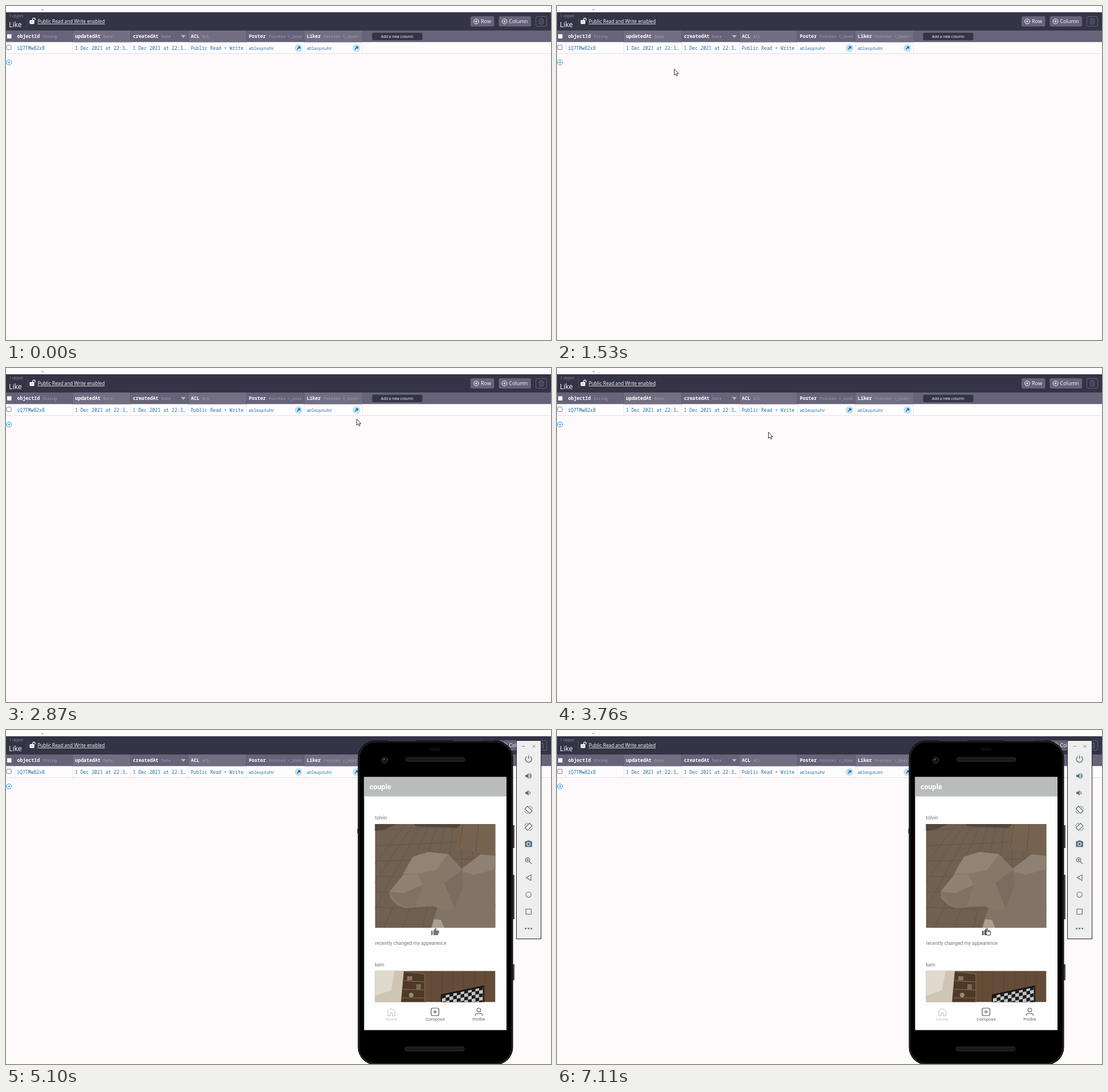
An HTML page for the animation above (8000 ms loop, 955 by 586 pixels).

```html
<!DOCTYPE html>
<html lang="en">
<head>
<meta charset="utf-8">
<title>Data browser and phone</title>
<style>
html, body { margin: 0; width: 100%; height: 100%; overflow: hidden; background: #fefafb; }
svg { display: block; width: 955px; height: 586px; }
.ui { font-family: "Open Sans", "Noto Sans", sans-serif; }
.mono { font-family: "Noto Sans Mono", "DejaVu Sans Mono", monospace; }
.app { font-family: Roboto, sans-serif; }
text { white-space: pre; }
</style>
</head>
<body>
<svg id="stage" viewBox="0 0 955 586" xmlns="http://www.w3.org/2000/svg"></svg>
<script>
const LOOP = 8000, PHONE_AT = 5100, HAND_AT = 6640, PRESS_AT = 6980;
const DARK = '#353446', BAR = '#66637a', BAR_LIGHT = '#726f84';
const LINK = '#1f72ab', BLUE = '#169cee', TOOL = '#546e7a';

const rect = (x, y, w, h, fill, extra = '') =>
  `<rect x="${x}" y="${y}" width="${w}" height="${h}" fill="${fill}" ${extra}/>`;
const text = (x, y, size, fill, str, font = 'ui', extra = '') =>
  `<text x="${x}" y="${y}" font-size="${size}" fill="${fill}" class="${font}" ${extra}>${str}</text>`;
const path = (d, fill, extra = '') => `<path d="${d}" fill="${fill}" ${extra}/>`;
const line = (d, color, width = 1, extra = '') =>
  `<path d="${d}" fill="none" stroke="${color}" stroke-width="${width}" ${extra}/>`;
const circle = (x, y, r, fill, extra = '') =>
  `<circle cx="${x}" cy="${y}" r="${r}" fill="${fill}" ${extra}/>`;
const at = (x, y, body, scale = 1) => `<g transform="translate(${x} ${y}) scale(${scale})">${body}</g>`;
const clipped = (id, x, y, w, h, body) =>
  `<clipPath id="${id}">${rect(x, y, w, h, '#000')}</clipPath><g clip-path="url(#${id})">${body}</g>`;
const plus = (x, y, r, color) =>
  circle(x, y, r, 'none', `stroke="${color}"`) +
  line(`M${x - r / 2} ${y}h${r}M${x} ${y - r / 2}v${r}`, color);

// [x, name, type, name width, light background]
const columns = [
  [15, 'objectId', 'String', 45, 0],
  [116.5, 'updatedAt', 'Date', 50, 1],
  [218, 'createdAt', 'Date', 50, 0],
  [319.5, 'ACL', 'ACL', 20.5, 1],
  [421, 'Poster', 'Pointer &lt;_User&gt;', 35.5, 0],
  [522.5, 'Liker', 'Pointer &lt;_User&gt;', 30.5, 1]
];
const cells = ['iQ7TMwB2xB', '1 Dec 2021 at 22:3…', '1 Dec 2021 at 22:3…',
  'Public Read + Write', 'aDlmzpXuhV', 'aDlmzpXuhV'];

function toolbar() {
  return rect(0, 0, 955, 11, '#fefcfd') +
    path('M61.5 7q2.5-3 5 0z', '#4b9cc9') +
    rect(0, 11, 955, 32.5, DARK) +
    text(5.5, 20, 6.7, '#8f8da0', '1 object') +
    text(5, 37, 12.3, '#fff', 'Like') +
    rect(37, 18, 1, 18, '#494757') +
    rect(41.5, 24.8, 8, 6.7, '#fff', 'rx=".8"') +
    line('M46.8 25v-1.8a2.1 2.1 0 0 1 4.2 0v2', '#fff', 1.2) +
    rect(45, 27, 1, 2, DARK) +
    text(55.5, 30.3, 8.25, '#fff', 'Public Read and Write enabled') +
    rect(55.5, 31.3, 117.5, .8, '#fff') +
    rect(814, 18, 41.5, 18, BAR, 'rx="2.5"') + plus(824, 27, 4.3, '#fff') +
    text(832, 30.4, 9.1, '#fff', 'Row') +
    rect(863.5, 18, 56.5, 18, BAR, 'rx="2.5"') + plus(873.5, 27, 4.3, '#fff') +
    text(881.3, 30.4, 9.1, '#fff', 'Column') +
    rect(928.5, 18.5, 19, 17, 'none', `rx="2.5" stroke="${BAR}"`) +
    line('M933.5 24h9M936.5 23.5v-1.5h3v1.5M934.5 24v7.5h7V24M937 26v4M939.2 26v4', BAR);
}

function table() {
  let s = rect(0, 43, 955, 20.5, BAR) + rect(0, 63.5, 955, 20, '#fefcfd');
  columns.forEach(([x, name, type, w, light], i) => {
    if (light) s += rect(x, 43, 101.5, 20.5, BAR_LIGHT);
    s += text(x + 4.5, 56, 8.25, '#fff', name, 'mono', 'font-weight="600"') +
      clipped('head' + i, x, 43, 98.5, 21, text(x + 4 + w, 55.5, 6.95, '#a3a0b3', type, 'mono')) +
      rect(x - .3, 43, .8, 20.5, '#5c596f') + rect(x, 63.5, .8, 20, '#e6e2ea') +
      text(x + 4.2, i > 3 ? 76.6 : 76.9, i > 3 ? 7.4 : 8.12, LINK, cells[i], 'mono');
    if (i > 3) s += circle(x + 91.5, 73.8, 6.8, '#c6e2f2') +
      line(`M${x + 89} 76.3l4.5-4.5M${x + 90.3} 71.5h3.6v3.6`, '#0e69a1', 1.5);
  });
  return s + rect(624, 63.5, .8, 20, '#e6e2ea') + rect(0, 83, 955, 1, '#e3dfe7') +
    path('M306.5 51h8.5l-4.25 5z', '#b5b3c2') +
    rect(2, 49.5, 7.5, 7.5, '#fff', 'rx=".7"') +
    rect(1.2, 68.7, 7.8, 7.8, '#fff', 'rx="1.3" stroke="#737078" stroke-width=".9"') +
    rect(641.5, 47, 88, 13, DARK, 'rx="2.5"') +
    text(657, 55.9, 6.6, '#fff', 'Add a new column') +
    plus(5.3, 99, 4.4, BLUE);
}

function dogPhoto() {
  let planks = '';
  for (let i = 0; i < 11; i++) planks += `M${560 + i * 34} 347L${700 + i * 14} 165`;
  for (let i = 0; i < 7; i++) planks += `M647 ${176 + i * 27}L860 ${163 + i * 31}`;
  const scene = rect(646.5, 165, 211, 182, '#6f6051') +
    line(planks, '#615345', .8) +
    path('M646 165h40l-24 10-16 2z', '#55473b') +
    path('M715 165h82l-6 7-72-3z', '#54463a') +
    path('M797 165h61v57l-68-15z', '#75634f') +
    line('M801 165l-7 41M828 165l-5 48', '#5f4f40') +
    path('M794 247l38-29 26 3v126H744l12-35z', '#817466') +
    path('M832 218l-38 29 26 7 38-10v-23z', '#8e8172') +
    path('M672 284l24-30 10-20 8-12 26-8 35 4 25 27 2 28-16 41-18 3-18-8-32 2-18 2-15-6-12-12z', '#857869') +
    path('M672 284l24-30 24-2 10 20-32 14z', '#8f8272') +
    path('M706 234l8-12 26-8 35 4-21 28-34 6h-24z', '#918474') +
    path('M775 218l25 27 2 28-16 41-18-46-14-22z', '#7a6d5f') +
    path('M775 218l25 27-32 23-14-22z', '#857868') +
    path('M672 284l13 17 15 12 18-3 12-38-32 14z', '#7f7263') +
    path('M750 332l12 1 6 14h-22z', '#ab9f90');
  return clipped('dog', 646.5, 165, 211, 182, scene);
}

function roomPhoto() {
  let boards = '';
  for (let x = 745; x < 857; x += 19) boards += `M${x} 422.5v55`;
  const scene = rect(646.5, 422.5, 211, 55, '#644c38') + line(boards, '#59432f', .8) +
    path('M646.5 422.5H697l-5 55h-45.5z', '#cfc5b5') +
    path('M646.5 422.5H681l-6 34-28.5 10z', '#e0d9cd') +
    path('M698 424l36 4v49.5h-41z', '#4c3928') +
    line('M698 440l36 2M696 455l38 1M694 470h40M699 424l35 4v50', '#7a5f44', 1.6) +
    rect(703, 432, 9, 7, '#8a735a') + circle(710, 465, 4, '#a08a6e') +
    rect(719, 446, 8, 9, '#7d664e') +
    `<pattern id="check" width="13" height="12" patternUnits="userSpaceOnUse" patternTransform="translate(764 465) skewY(-12)">
      ${rect(0, 0, 13, 12, '#c4c4c4')}${rect(0, 0, 6.5, 6, '#1c1c1c')}${rect(6.5, 6, 6.5, 6, '#1c1c1c')}</pattern>` +
    path('M762 464l76-16v29.5h-76z', '#171615') +
    path('M764 466.5l72-15v26h-72z', 'url(#check)');
  return clipped('room', 646.5, 422.5, 211, 55, scene);
}

const THUMB = 'M1 21h4V9H1zM23 10c0-1.1-.9-2-2-2h-6.3l1-4.6c0-.7-.1-1.1-.5-1.5L14.2 1 7.6 7.6C7.2 8 7 8.5 7 9v10c0 1.1.9 2 2 2h9c.8 0 1.5-.5 1.8-1.2l3-7c.1-.3.2-.5.2-.8z';

function tools() {
  const speaker = path('M3 9v6h4l5 5V4L7 9z', TOOL);
  const turn = line('M9.3 1.8L22.2 14.7l-7.5 7.5L1.8 9.3z', TOOL, 2, 'stroke-linejoin="round"') +
    line('M14 1.2q7.5 1 9 8M10 22.8q-7.500-1-9-8', TOOL, 1.4);
  const icons = [
    line('M12 2v10M7 5a9 9 0 1 0 10 0', TOOL, 2.2),
    speaker + line('M14.5 8q4 4 0 8M15 4q10 8 0 16', TOOL, 2),
    speaker + line('M14.5 8q4 4 0 8', TOOL, 2),
    turn,
    `<g transform="matrix(-1 0 0 1 24 0)">${turn}</g>`,
    path('M2 5h5l2-2.5h6L17 5h5v16H2z', TOOL) + circle(12, 13, 4.5, 'none', 'stroke="#eee" stroke-width="2"'),
    circle(9.5, 9.5, 6, 'none', `stroke="${TOOL}" stroke-width="2"`) +
      line('M14 14l7 7M6.5 9.5h6M9.5 6.5v6', TOOL, 2),
    line('M19 4v16L5 12z', TOOL, 1.8),
    circle(12, 12, 7.5, 'none', `stroke="${TOOL}" stroke-width="1.8"`),
    line('M4.5 4.5h15v15h-15z', TOOL, 1.8),
    [4, 12, 20].map(x => circle(x, 12, 2.3, TOOL)).join('')
  ];
  return rect(894.5, 18.5, 43, 348, '#eee', 'stroke="#222"') +
    line('M904.5 28.5h5M922.5 26l5 5M927.5 26l-5 5', '#777', .9) +
    icons.map((icon, i) => at(908.2, 43.4 + i * 29.75, icon, .62)).join('');
}

function phone() {
  const side = (y, h) => rect(888, y, 3, h, '#4d4d52');
  const label = (x, color, name) => text(x, 510.3, 7.9, color, name, 'app', 'text-anchor="middle"');
  return side(167, 40) + side(254, 78) + side(411, 28) + rect(615.5, 173, 2, 8, '#555') +
    rect(616.5, 18.5, 272, 569, '#000', 'rx="31"') +
    rect(618.5, 20.5, 268, 565, 'none', 'rx="29" stroke="#242426" stroke-width="2"') +
    line('M670 18.5h49M783 18.5h52', '#4a4753') +
    rect(743, 31, 18, 6, '#0d0d0d', 'rx="2"') +
    circle(663.5, 53, 5.8, '#29292b') + circle(663.5, 53, 3.5, '#0c0c0d') + circle(662.5, 52, 1.3, '#77777c') +
    rect(700.5, 48.5, 103.5, 6.5, '#191919', 'rx="3" stroke="#303030"') +
    rect(699, 556, 104, 7, '#191919', 'rx="3" stroke="#303030"') +
    rect(627.5, 82.5, 249.5, 444, '#fefefe') +
    rect(627.5, 82.5, 249.5, 34, '#babcbb') +
    text(637, 104.2, 12.5, '#fff', 'couple', 'app', 'font-weight="700"') +
    text(646.5, 157.2, 8.57, '#777', 'tolvin', 'app') + dogPhoto() +
    at(744.4, 346.6, path(THUMB, '#757575', 'id="like"'), .636) +
    text(646.5, 376.8, 8.57, '#777', 'recently changed my appearence', 'app') +
    text(646.5, 415.2, 8.57, '#777', 'kem', 'app') + roomPhoto() +
    rect(640, 482, 224, .7, '#f2f2f2') +
    line('M667.5 494.5l7.5-6.5 7.5 6.5M669 493.5v8h4v-5h4v5h4.5v-8', '#bbb') +
    rect(745, 488, 13.5, 13, 'none', 'rx="2.5" stroke="#555" stroke-width="1.2"') +
    line('M748.5 494.5h6.5M751.75 491.3v6.5', '#555', 1.2) +
    circle(828.5, 491.3, 3.3, 'none', 'stroke="#555" stroke-width="1.1"') +
    line('M822.5 501.5v-1q0-3 3-3h6q3 0 3 3v1', '#555', 1.1) +
    label(675, '#c4c4c4', 'Home') + label(752, '#666', 'Compose') + label(828.5, '#666', 'Profile') +
    tools();
}

// Each move: start, end, steps, then keys of [step, x, y]; the pointer holds between steps.
const moves = [
  [530, 1320, 13, [0, 941, 578], [3, 865, 465], [7, 733, 325], [10, 545, 195], [12, 403, 124]],
  [1390, 1860, 8, [0, 335, 123], [4, 75, 97], [6, 13, 87], [7, 22, 88]],
  [2060, 2800, 12, [0, 48, 85], [2, 172, 78.5], [5, 335, 69], [9, 530, 85], [11, 599, 91]],
  [2870, 2870, 1, [0, 614, 89]],
  [3220, 3560, 6, [0, 590, 92], [3, 425, 95], [5, 347, 95]],
  [3760, 4230, 8, [0, 370, 112], [4, 655, 370], [7, 819, 529]],
  [4430, 4500, 2, [0, 821, 545], [1, 825, 570]],
  [4570, 4570, 1, [0, -50, -50]],
  [5630, 6370, 11, [0, 822, 558], [4, 795, 468], [8, 757, 373], [10, 749, 354]],
  [6640, 6710, 2, [0, 750, 348], [1, 750, 347]]
];

function pointer(t) {
  const move = moves.filter(m => m[0] <= t).pop();
  if (!move) return [-50, -50];
  const [start, end, steps, ...keys] = move;
  const gap = (end - start) / (steps - 1) || 1;
  const k = Math.min(steps - 1, Math.floor((t - start + 2) / gap));
  const next = keys.findIndex(key => key[0] >= k);
  const b = keys[next], a = keys[Math.max(0, next - 1)];
  const u = b[0] > a[0] ? (k - a[0]) / (b[0] - a[0]) : 1;
  return [a[1] + (b[1] - a[1]) * u, a[2] + (b[2] - a[2]) * u];
}

const ARROW = path('M.5.5v10.7L3 9l1.7 3.7 1.700-.8L4.800 8.400H8z', '#fff', 'id="arrow" stroke="#222" stroke-width=".9"');
const HAND = `<g id="hand">${
  path('M2.500 8V1.500q1-1.500 2 0V5l4.500 1q1.200.5 1 2l-.8 5H4.200L.8 8.800q.2-1.500 1.700-.8z', '#fff', 'stroke="#222" stroke-width=".9"') +
  line('M4.800 8V5.500M6.600 8V6M8.300 8.200V6.300', '#222', .8)}</g>`;

const stage = document.getElementById('stage');
stage.innerHTML = rect(0, 0, 955, 586, '#fefafb') + toolbar() + table() +
  `<g id="phone">${phone()}</g><g id="pointer">${ARROW}${HAND}</g>`;
const [phoneEl, likeEl, pointerEl, arrowEl, handEl] =
  ['phone', 'like', 'pointer', 'arrow', 'hand'].map(id => document.getElementById(id));
const show = (el, on) => el.setAttribute('visibility', on ? 'visible' : 'hidden');

function draw(t) {
  const [x, y] = pointer(t);
  pointerEl.setAttribute('transform', `translate(${Math.round(x)} ${Math.round(y)})`);
  show(phoneEl, t >= PHONE_AT);
  show(arrowEl, t < HAND_AT);
  show(handEl, t >= HAND_AT);
  likeEl.setAttribute('fill', t >= PRESS_AT ? '#555' : '#757575');
}

const began = performance.now();
function tick() {
  draw((performance.now() - began) % LOOP);
  requestAnimationFrame(tick);
}
tick();
</script>
</body>
</html>
```
